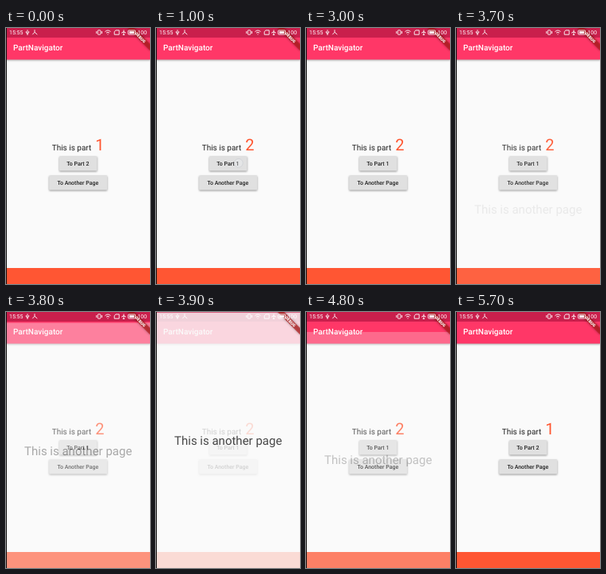
An HTML page for the animation above (5800 ms loop, 181x320 px).

```html
<!DOCTYPE html>
<html lang="en">
<head>
<meta charset="utf-8">
<title>PartNavigator</title>
<style>
  html, body { margin: 0; width: 100%; height: 100%; overflow: hidden; background: #fafafa; }
  svg { display: block; width: 181px; height: 320px; }
  text { font-family: Roboto, sans-serif; fill: #212121; text-rendering: geometricPrecision; }
  .medium { font-size: 7px; font-weight: 500; text-anchor: middle; }
  .button { fill: #e0e0e0; filter: drop-shadow(0 1px .8px #0006); }
  .icon { fill: none; stroke: #fff; stroke-width: .9; }
</style>
</head>
<body>
<svg viewBox="0 0 181 320">
  <rect width="181" height="320" fill="#fafafa"/>

  <g id="home">
    <rect width="181" height="39.5" fill="#ff3767" style="filter:drop-shadow(0 1px 1px #0005)"/>
    <rect width="181" height="12" fill="#c91f4c"/>
    <text x="9" y="28.3" font-size="10" font-weight="500" style="fill:#fff">PartNavigator</text>
    <text x="57.7" y="152.7" font-size="10">This is part</text>
    <text id="part" x="112.3" y="152.7" font-size="20" style="fill:#ff5630">1</text>
    <rect class="button" x="67" y="160.3" width="47.5" height="18.2" rx="1"/>
    <text id="label" class="medium" x="90.3" y="172">To Part 2</text>
    <rect class="button" x="54.2" y="184.3" width="73" height="18.2" rx="1"/>
    <text class="medium" x="90.3" y="196">To Another Page</text>
    <rect y="300" width="181" height="20" fill="#ff5633"/>
  </g>

  <g id="page">
    <rect width="181" height="320" fill="#fafafa"/>
    <text x="90.7" y="165.3" font-size="15" text-anchor="middle">This is another page</text>
  </g>

  <!-- debug ribbon -->
  <g transform="translate(181 0) rotate(45)">
    <rect x="-20" y="14" width="40" height="6" fill="#b71c1c" fill-opacity=".7" style="filter:drop-shadow(0 0 1.5px #0008)"/>
    <text y="18.8" font-size="5.1" font-weight="900" text-anchor="middle" style="fill:#fff">DEBUG</text>
  </g>

  <!-- status bar -->
  <g style="--w:#fff">
    <text x="4" y="8.4" font-size="7" style="fill:#fff">15:55</text>
    <path class="icon" d="M27 2.3V9M25.3 4.2V6L27 7.2L28.7 5.8V4.2"/>
    <path class="icon" d="M36 2.2V5.2L33.3 8.2M36 5.2L39.3 8.2"/>
    <rect class="icon" x="115.4" y="2.8" width="3.4" height="5.4" rx=".6"/>
    <path class="icon" d="M113.7 4V7M120.5 4V7"/>
    <path class="icon" d="M124.5 4.6Q128 1.4 131.5 4.6M126 6.2Q128 4.4 130 6.2M127.5 7.9H128.5"/>
    <path class="icon" d="M136.2 8.2V4.6L138 2.9H142.2V8.2Z"/>
    <path class="icon" d="M148 2.4V8.5M145.2 6.2L148 4.6L150.8 6.2M146.8 8.5H149.2"/>
    <rect class="icon" x="153.6" y="3" width="9" height="5" rx=".7"/>
    <rect x="155" y="4.2" width="6.2" height="2.6" fill="#fff"/>
    <text x="165.5" y="8.3" font-size="6.8" style="fill:#fff">100</text>
  </g>

  <circle id="touch" r="5.4" fill="#f3f6fb" fill-opacity=".7" stroke="#aeb6c0" stroke-width=".7"/>
  <rect width="1" height="320" fill="#111"/>
</svg>

<script>
const LOOP = 5800, STEP = 100, FADE = 300;
const [part, label, page, touch] =
  ['part', 'label', 'page', 'touch'].map(id => document.getElementById(id));

// press, release, gone, y
const taps = [
  [900, 1000, 1200, 168.8],
  [1800, 2000, 2200, 168.8],
  [2700, 2800, 3000, 168.8],
  [3500, 3600, 3700, 193],
  [5500, 5600, 5700, 168.8]
];
const swaps = [1000, 2000, 2800, 5600];

const clamp = v => Math.min(1, Math.max(0, v));

function bezier(x1, y1, x2, y2) {
  const at = (a, b, s) => 3 * a * s * (1 - s) ** 2 + 3 * b * s * s * (1 - s) + s ** 3;
  return x => {
    let lo = 0, hi = 1;
    for (let i = 0; i < 24; i++) {
      const mid = (lo + hi) / 2;
      if (at(x1, x2, mid) < x) lo = mid; else hi = mid;
    }
    return at(y1, y2, lo);
  };
}
const slide = bezier(.4, 0, .2, 1);
const fade = bezier(.42, 0, 1, 1);

// how far the second page has been pushed, 0 to 1
const pushed = t => t < 4800 ? clamp((t - 3635) / FADE) : clamp(1 - (t - 4632) / FADE);

function draw(now) {
  const t = Math.floor(now % LOOP / STEP) * STEP;

  const second = swaps.filter(s => t >= s).length % 2;
  part.textContent = 1 + second;
  label.textContent = 'To Part ' + (2 - second);

  const p = pushed(t);
  page.setAttribute('opacity', fade(p));
  page.setAttribute('transform', `translate(0 ${80 * (1 - slide(p))})`);

  const tap = taps.find(([on, , off]) => t >= on && t < off);
  touch.setAttribute('opacity', tap ? (t < tap[1] ? 1 : .4) : 0);
  if (tap) touch.setAttribute('transform', `translate(103.8 ${tap[3]})`);

  requestAnimationFrame(draw);
}
draw(performance.now());
</script>
</body>
</html>
```
